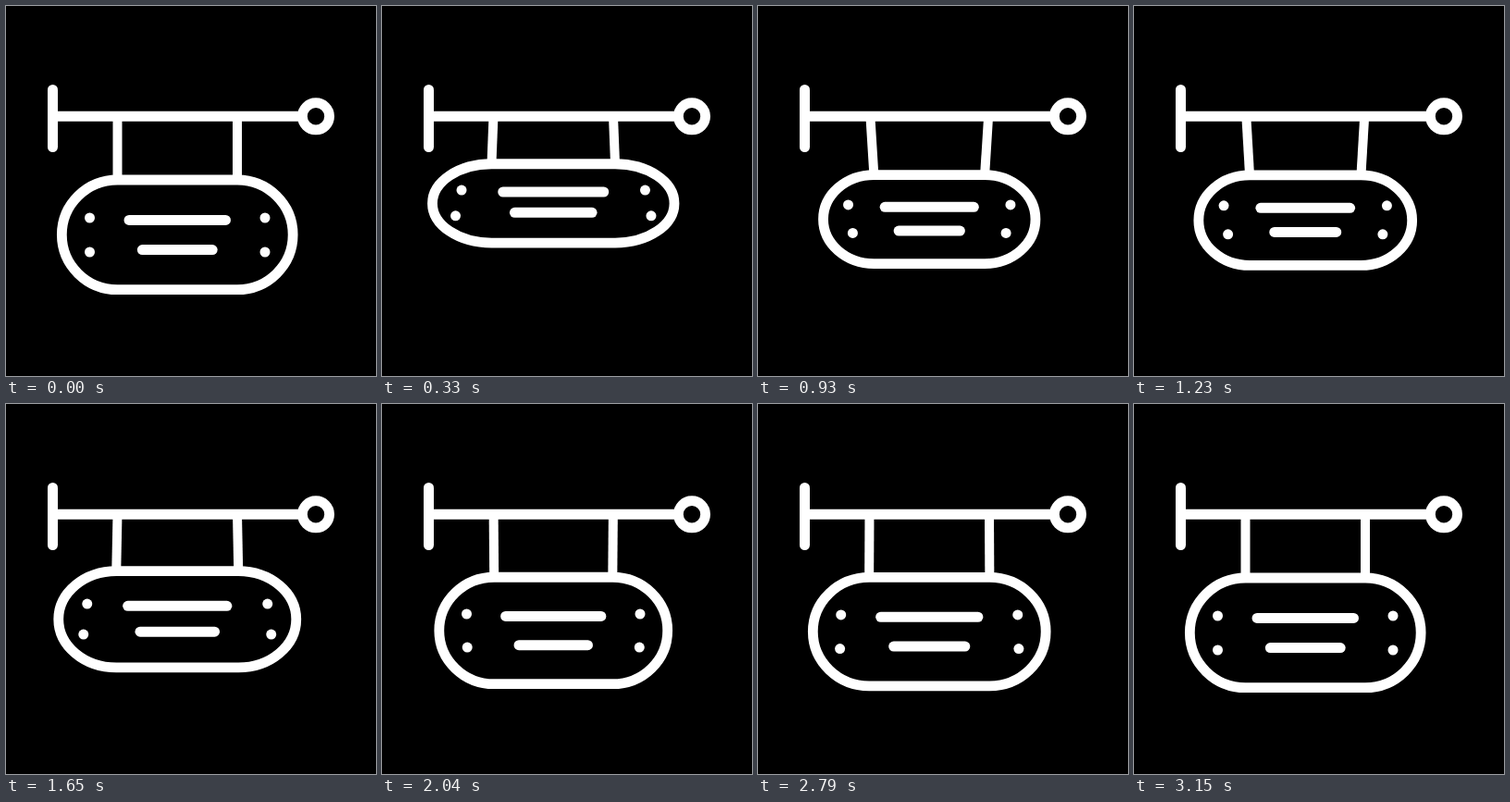
These frames come from a looping animation (400x400 px, 3180 ms). An HTML page with a canvas:

```html
<!DOCTYPE html>
<html>
<head>
<meta charset="utf-8">
<style>
html, body { margin: 0; height: 100%; overflow: hidden; background: #000; }
canvas { display: block; }
</style>
</head>
<body>
<canvas id="stage" width="400" height="400"></canvas>
<script>
const ctx = document.getElementById('stage').getContext('2d');
const LOOP = 3180, CX = 185.25;

// Damped swing: [start, end, amplitude]; positive is towards the viewer
const LOBES = [
  [0, 715, 1.65], [715, 1425, -1.33], [1425, 1990, 1.05],
  [1990, 2490, -0.5], [2490, 3000, 0.29]
];
const easeUp = p => (1 - Math.cos(Math.PI * p)) / 2;

function swing(t) {
  if (t < 357) return 1.65 * easeUp(t / 357);
  if (t > 2745) return 0.29 * easeUp(Math.max(0, (3150 - t) / 405));
  const [start, end, amp] = LOBES.find(l => t < l[1]);
  return amp * Math.sin(Math.PI * (t - start) / (end - start));
}

function line(x1, y1, x2, y2, width, cap = 'round') {
  ctx.lineWidth = width;
  ctx.lineCap = cap;
  ctx.beginPath();
  ctx.moveTo(x1, y1);
  ctx.lineTo(x2, y2);
  ctx.stroke();
}

function circle(x, y, r) {
  ctx.beginPath();
  ctx.arc(x, y, r, 0, 2 * Math.PI);
}

function drawBracket() {
  line(50.5, 90.5, 50.5, 152.5, 11);
  line(50.5, 119.3, 318, 119.3, 11, 'butt');
  ctx.lineWidth = 10.8;
  circle(335, 119.3, 14.6);
  ctx.stroke();
}

function drawSign(a) {
  const front = a > 0;
  const lift = front ? 1.1 * a * a / (1 + 0.1 * a * a) : -a;
  const wide = (rest, near, far) => rest + a * (front ? near : far);
  const high = (rest, near, far) => rest - lift * (front ? near : far);

  const edge = wide(64.75, 1.25, 4.5);
  const half = wide(124.9, 3.6, 9.4);
  const top = high(188, 7.5, 5);
  const bottom = high(306.7, 22, 26);
  const mid = (top + bottom) / 2, rx = half - edge, ry = (bottom - top) / 2;

  for (const side of [-1, 1]) {
    line(CX + side * wide(64.75, 0, 0.8), 119, CX + side * edge, top, 10, 'butt');
  }

  ctx.lineWidth = 10.8;
  ctx.beginPath();
  ctx.ellipse(CX + edge, mid, rx, ry, 0, -Math.PI / 2, Math.PI / 2);
  ctx.ellipse(CX - edge, mid, rx, ry, 0, Math.PI / 2, Math.PI * 1.5);
  ctx.closePath();
  ctx.stroke();

  const bar = (w, y) => line(CX - w, y, CX + w, y, 11);
  bar(wide(52.2, 1.4, 3.8), high(231.4, 13.2, 13));
  bar(wide(37.9, 2.4, 4.4), high(263.6, 17.5, 19));

  const studs = (w, y) => [-1, 1].forEach(side => {
    circle(CX + side * w, y, 5.5);
    ctx.fill();
  });
  studs(wide(94.75, 2.75, 6.5), high(229, 13, 13));
  studs(wide(94.75, 6.75, 11), high(266, 17, 19));
}

function draw(now) {
  ctx.fillStyle = '#000';
  ctx.fillRect(0, 0, 400, 400);
  ctx.fillStyle = ctx.strokeStyle = '#fff';
  drawSign(swing(now % LOOP));
  drawBracket();
  requestAnimationFrame(tick);
}

let start;
function tick(now) {
  start ??= now;
  draw(Math.max(0, now - start));
}
requestAnimationFrame(tick);
</script>
</body>
</html>
```
